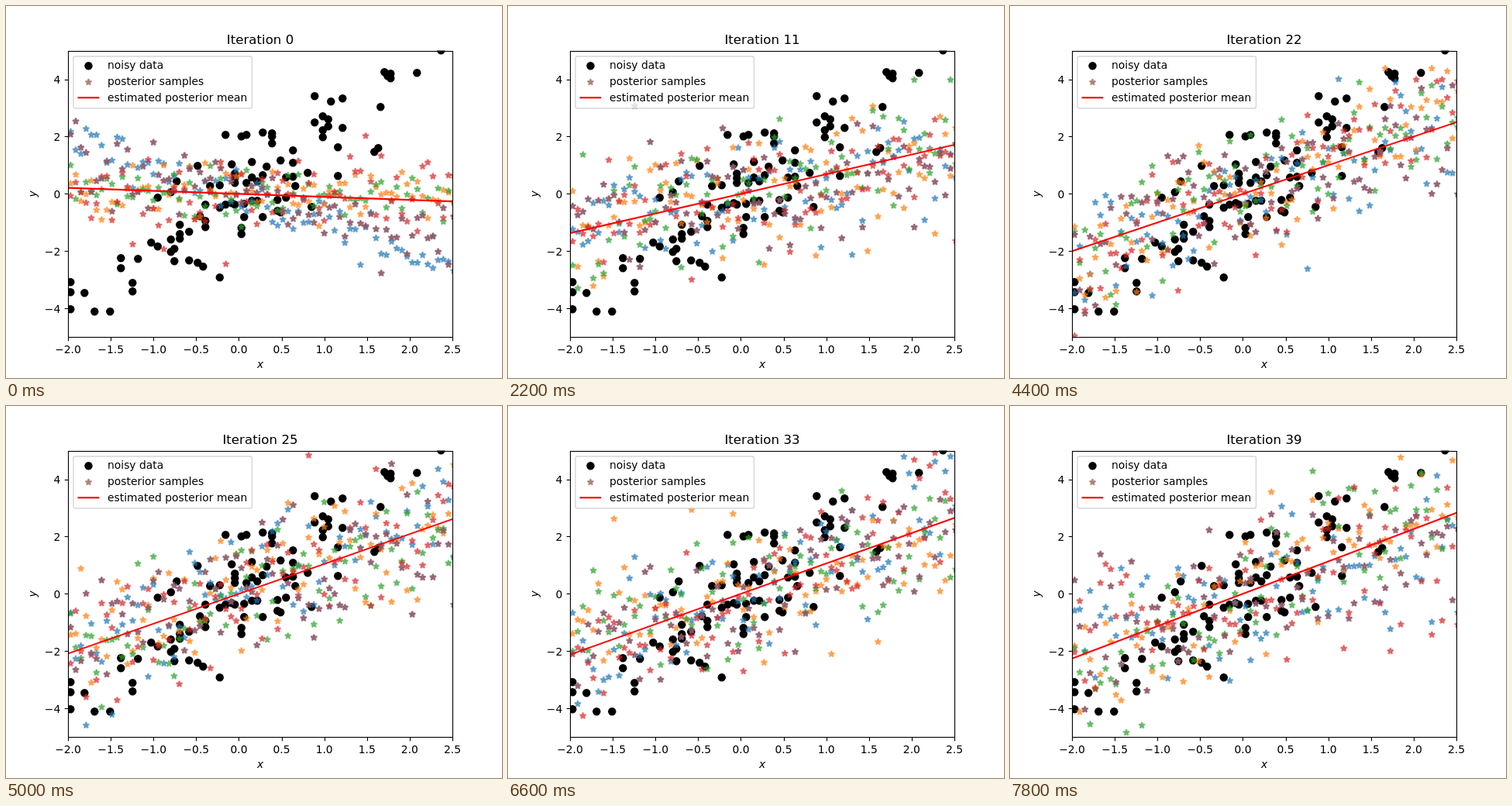
Animation, 640 px wide and 480 px high, one loop 8000 ms. Source, as an HTML page with a canvas:

```html
<!DOCTYPE html>
<html lang="en">
<head>
<meta charset="utf-8">
<title>Posterior fit</title>
<style>
  html, body { margin: 0; width: 100%; height: 100%; overflow: hidden; background: #fff; }
  canvas { display: block; }
</style>
</head>
<body>
<canvas id="plot" width="640" height="480"></canvas>
<script>
const ctx = document.getElementById('plot').getContext('2d');
const STEP_MS = 200, STEPS = 40;
const PT = 100 / 72;
const LEFT = 80, TOP = 57.6, WIDTH = 496, HEIGHT = 369.6;
const FONT = '"DejaVu Sans", sans-serif';
const BLUE = '#1f77b4', ORANGE = '#ff7f0e', GREEN = '#2ca02c', RED = '#d62728';
const PURPLE = '#9467bd', BROWN = '#8c564b';

const toX = x => LEFT + (x + 2) / 4.5 * WIDTH;
const toY = y => TOP + (5 - y) / 10 * HEIGHT;
const snap = v => Math.round(v) + 0.5;

// Noisy data in pixels: each row is an x followed by its y values.
const DATA = [
  [83, 356, 369, 391], [101, 370], [114, 394], [134, 394], [148, 325, 338], [163, 368, 357],
  [170, 326], [187, 305], [195.5, 310, 247], [212.5, 240, 301, 317], [217, 329, 313], [220, 226],
  [224, 282, 300, 294], [236, 291, 328], [247, 331, 206], [250, 271], [254, 336],
  [257, 256, 277, 285], [263, 232], [275.5, 350, 231, 260], [283, 256, 166], [291, 204, 254],
  [295, 216, 222, 228, 256], [303.5, 168, 286, 294], [307, 255, 272], [310, 166, 228],
  [317, 201, 221, 251], [324, 226, 251], [331, 163, 218, 272], [336, 207], [343, 164, 168, 177],
  [350, 250, 264], [354, 199, 266], [361, 221, 247], [370, 186, 202, 220], [373, 232],
  [389, 215], [394, 259], [398, 116, 150], [408.5, 142, 160, 169], [415.5, 146, 155],
  [419, 123], [428, 182, 219], [434, 119, 157], [475, 188], [480, 183], [483, 130],
  [488, 85], [492, 90], [496, 87, 93], [530, 86], [561, 57]
];

// Each sample set is drawn once per colour; the last is plotted twice.
const SAMPLES = [
  { colors: [BLUE], slope: -1, noise: 0.4 },
  { colors: [ORANGE], slope: -0.12, noise: 0.6 },
  { colors: [GREEN], slope: -0.08, noise: 0.55 },
  { colors: [RED], slope: 0.08, noise: 0.75 },
  { colors: [PURPLE, BROWN], slope: -0.6, noise: 0.5 }
];

// Slope of the mean at a few iterations, approached exponentially.
const SLOPES = [[0, -0.105], [6, 0.413], [16, 0.86], [22, 1], [29, 1.085], [33, 1.06], [39, 1.13]];
const decay = n => Math.exp(-n / 11);

function meanSlope(n) {
  const i = Math.max(1, SLOPES.findIndex(([step]) => step >= n));
  const [n0, s0] = SLOPES[i - 1], [n1, s1] = SLOPES[i];
  return s0 + (s1 - s0) * (decay(n0) - decay(n)) / (decay(n0) - decay(n1));
}

function gaussian(seed) {
  const random = () => {
    seed = (seed + 0x6D2B79F5) | 0;
    let t = Math.imul(seed ^ (seed >>> 15), 1 | seed);
    t = (t + Math.imul(t ^ (t >>> 7), 61 | t)) ^ t;
    return ((t ^ (t >>> 14)) >>> 0) / 4294967296;
  };
  return () => Math.sqrt(-2 * Math.log(1 - random())) * Math.cos(2 * Math.PI * random());
}

function dot(x, y) {
  ctx.fillStyle = '#000';
  ctx.beginPath();
  ctx.arc(x, y, 3.75 * PT, 0, 2 * Math.PI);
  ctx.fill();
}

function star(x, y, color) {
  ctx.beginPath();
  for (let i = 0; i < 10; i++) {
    const r = 3 * PT * (i % 2 ? 0.382 : 1), a = i * Math.PI / 5;
    ctx.lineTo(x + r * Math.sin(a), y - r * Math.cos(a));
  }
  ctx.closePath();
  ctx.globalAlpha = 0.55;
  ctx.fillStyle = ctx.strokeStyle = color;
  ctx.lineWidth = 1.5 * PT;
  ctx.lineJoin = 'bevel';
  ctx.fill();
  ctx.stroke();
  ctx.globalAlpha = 1;
}

function line(x0, y0, x1, y1, color, width) {
  ctx.strokeStyle = color;
  ctx.lineWidth = width;
  ctx.beginPath();
  ctx.moveTo(x0, y0);
  ctx.lineTo(x1, y1);
  ctx.stroke();
}

function text(label, x, y, align = 'center', points = 10, style = '') {
  ctx.font = `${style} ${points * PT}px ${FONT}`;
  ctx.textAlign = align;
  ctx.fillStyle = '#000';
  ctx.fillText(label, x, y);
}

function drawSamples(n) {
  const normal = gaussian(n * 7919 + 11);
  const mean = meanSlope(n);
  const spread = 0.55 + 0.65 * (1 - Math.exp(-n / 8));
  for (const sample of SAMPLES) {
    const slope = n ? mean + 0.25 * normal() : sample.slope;
    const noise = n ? spread : sample.noise;
    const points = Array.from({ length: 100 }, (_, i) => {
      const x = -3 + 6 * i / 99;
      return [toX(x), toY(slope * x + noise * normal())];
    });
    for (const color of sample.colors) {
      for (const [x, y] of points) star(x, y, color);
    }
  }
}

function drawAxes() {
  const width = 0.8 * PT, tick = 3.5 * PT;
  ctx.strokeStyle = '#000';
  ctx.lineWidth = width;
  ctx.lineJoin = 'miter';
  ctx.strokeRect(80.5, 58.5, 496, 369);
  const format = (v, digits) => v.toFixed(digits).replace('-', '\u2212');
  for (let v = -2; v <= 2.5; v += 0.5) {
    line(snap(toX(v)), 427.5, snap(toX(v)), 427.5 + tick, '#000', width);
    text(format(v, 1), toX(v), 448);
  }
  for (let v = -4; v <= 4; v += 2) {
    line(80.5 - tick, snap(toY(v)), 80.5, snap(toY(v)), '#000', width);
    text(format(v, 0), 70.3, toY(v) + 5.3, 'right');
  }
  text('x', 328, 467, 'center', 10, 'italic');
  ctx.save();
  ctx.translate(39, 242.4);
  ctx.rotate(-Math.PI / 2);
  text('y', 0, 0, 'center', 10, 'italic');
  ctx.restore();
}

function drawLegend() {
  ctx.beginPath();
  ctx.roundRect(87, 65, 230.5, 67, 2.8);
  ctx.fillStyle = 'rgba(255,255,255,.8)';
  ctx.strokeStyle = 'rgba(204,204,204,.8)';
  ctx.lineWidth = PT;
  ctx.fill();
  ctx.stroke();
  dot(106.5, 77.3);
  star(106.5, 98.3, BROWN);
  line(92.5, 118.3, 120.3, 118.3, '#f00', 1.5 * PT);
  text('noisy data', 131, 81, 'left');
  text('posterior samples', 131, 102, 'left');
  text('estimated posterior mean', 131, 123, 'left');
}

function draw(n) {
  ctx.fillStyle = '#fff';
  ctx.fillRect(0, 0, 640, 480);
  ctx.save();
  ctx.beginPath();
  ctx.rect(LEFT, TOP, WIDTH, HEIGHT);
  ctx.clip();
  for (const [x, ...ys] of DATA) {
    for (const y of ys) dot(x + 0.3, y + 0.3);
  }
  drawSamples(n);
  const slope = meanSlope(n);
  line(toX(-3), toY(-3 * slope), toX(3), toY(3 * slope), '#f00', 1.5 * PT);
  ctx.restore();
  drawAxes();
  text(`Iteration ${n}`, 328, 49.3, 'center', 12);
  drawLegend();
}

let shown = -1;
function tick() {
  const n = Math.floor(performance.now() / STEP_MS) % STEPS;
  if (n !== shown) draw(shown = n);
  requestAnimationFrame(tick);
}
tick();
</script>
</body>
</html>
```
